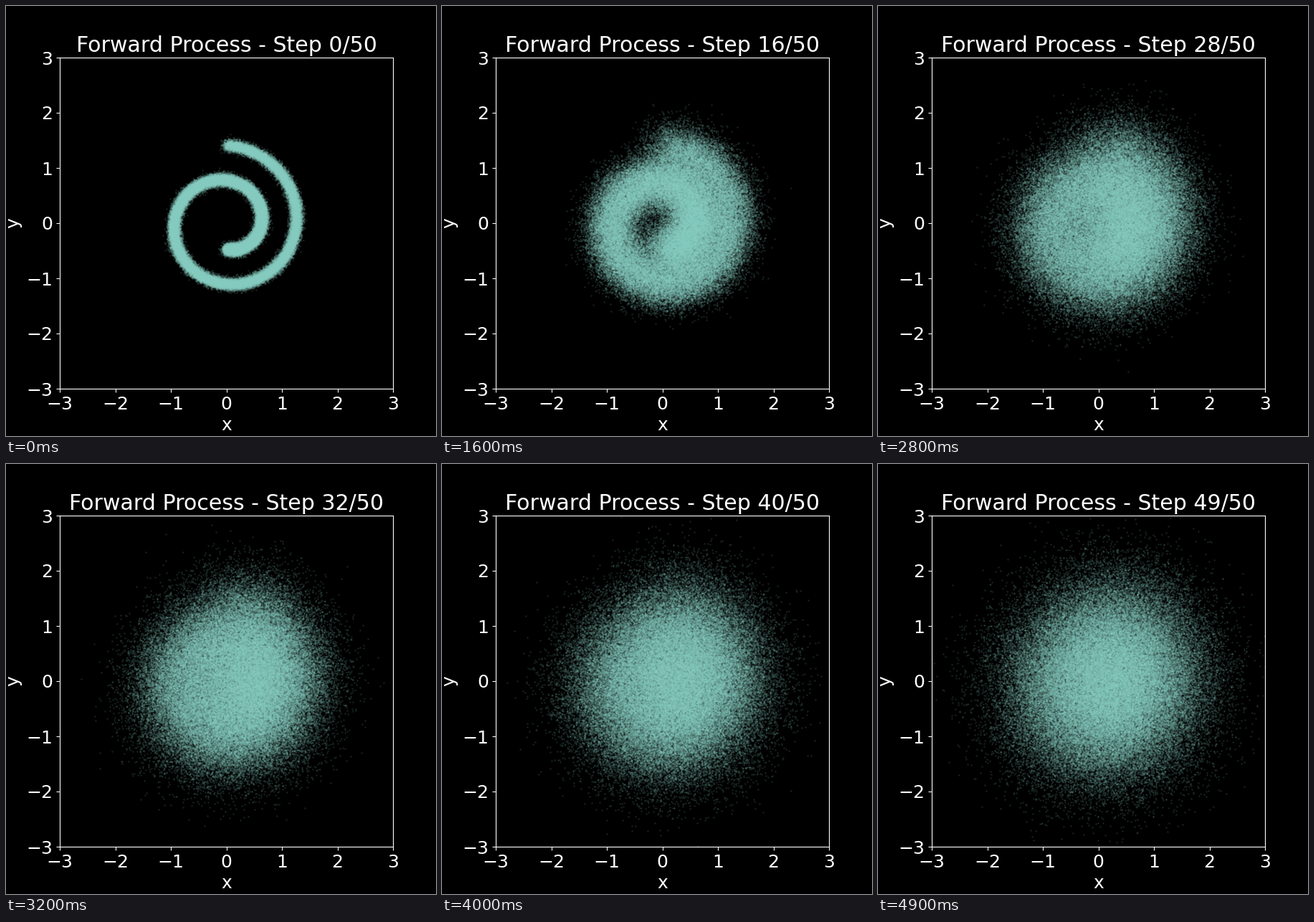
A matplotlib script that plays this animation: 600x600 px, repeating every 5000 ms.

```python
import numpy as np
import matplotlib.pyplot as plt
from matplotlib.animation import FuncAnimation

STEPS = 50
POINTS = 100_000
LIMIT = 3


def swiss_roll(count, noise=0.05):
    """Noisy 2D spiral running from 1.5 pi to 4.5 pi."""
    rng = np.random.default_rng(42)
    t = 1.5 * np.pi * (1 + 2 * rng.random(count))
    spiral = 0.1 * t[:, None] * np.column_stack([np.cos(t), np.sin(t)])
    return spiral + noise * rng.standard_normal((count, 2))


def diffuse(x, step):
    """Sample the variance-preserving forward process at one step."""
    noise = np.random.default_rng(step).standard_normal(x.shape)
    kept = alpha_bar[step]
    return np.sqrt(kept) * x + np.sqrt(1 - kept) * noise


alpha_bar = np.cumprod(1 - np.linspace(1e-4, 0.02, STEPS))
data = swiss_roll(POINTS)

plt.style.use("dark_background")
plt.rcParams.update({"font.family": "DejaVu Sans", "font.size": 18})

fig, ax = plt.subplots(figsize=(6, 6), dpi=100)
cloud = ax.scatter(*data.T, s=1, alpha=0.1, color="#8dd3c7")
ticks = range(-LIMIT, LIMIT + 1)
ax.set(xlim=(-LIMIT, LIMIT), ylim=(-LIMIT, LIMIT),
       xticks=ticks, yticks=ticks, xlabel="x", ylabel="y")
title = ax.set_title("")


def update(step):
    cloud.set_offsets(diffuse(data, step))
    title.set_text(f"Forward Process - Step {step}/{STEPS}")
    return cloud, title


anim = FuncAnimation(fig, update, frames=STEPS, interval=100,
                     repeat=True, repeat_delay=0)
plt.show()
```
